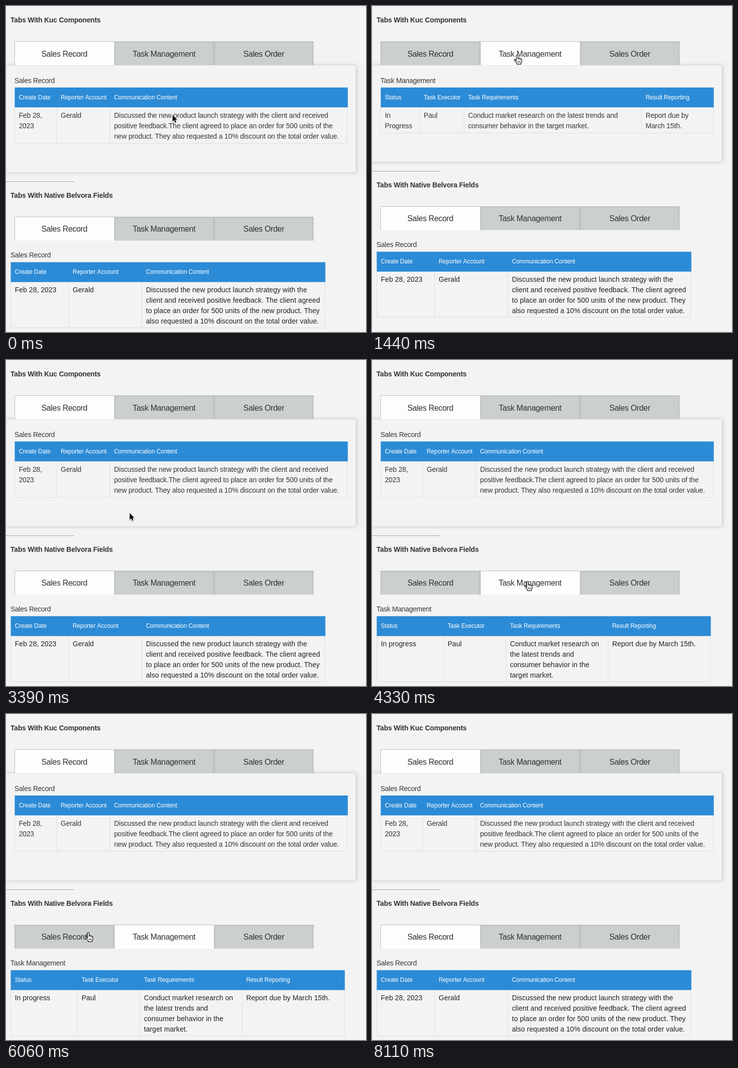
These frames come from a looping animation (722x656 px, 8230 ms). An HTML page with a canvas:

```html
<!DOCTYPE html>
<html lang="en">
<head>
<meta charset="utf-8">
<title>Tabs</title>
<style>
html, body { margin: 0; width: 722px; height: 656px; overflow: hidden; background: #f3f3f3; }
canvas { display: block; }
</style>
</head>
<body>
<canvas id="stage" width="722" height="656"></canvas>
<script>
const ctx = document.getElementById('stage').getContext('2d');
const W = 722, H = 656, LOOP = 8230;
const BG = '#f3f3f3', GREY = '#cbd0ce', BLUE = '#2c8bd6', LINE = '#dfdfdf', EDGE = '#bcc0be';
const FAMILY = '"Liberation Sans", Arial, sans-serif';
const STYLES = {
  heading: { font: 'bold 14px', gap: -0.2, color: '#333' },
  tab: { font: '16px', gap: -0.32, color: '#303030' },
  title: { font: '14px', gap: -0.28, color: '#363636' },
  head: { font: '12px', gap: -0.1, color: '#fff' },
  light: { font: '14px', gap: -0.145, color: '#363636' },
  cell: { font: '14px', gap: 0.08, color: '#202020' }
};
const TABS = ['Sales Record', 'Task Management', 'Sales Order'];
const HEADS = [
  ['Create Date', 'Reporter Account', 'Communication Content'],
  ['Status', 'Task Executor', 'Task Requirements', 'Result Reporting'],
  ['Order Number']
];

// cols: left edge of each column, then the right edge of the table
const UPPER = [
  { cols: [17, 101, 208, 685], panel: 702, lines: 3, cells: [
    'Feb 28,\n2023', 'Gerald',
    'Discussed the new product launch strategy with the client and received\n' +
    'positive feedback.The client agreed to place an order for 500 units of the\n' +
    'new product. They also requested a 10% discount on the total order value.'] },
  { cols: [17, 95, 184, 540, 685], panel: 702, lines: 2, cells: [
    'In\nProgress', 'Paul',
    'Conduct market research on the latest trends and\nconsumer behavior in the target market.',
    'Report due by\nMarch 15th.'] },
  { cols: [17, 109], panel: 634, lines: 1, cells: ['1'] }
];
const LOWER = [
  { cols: [9, 125, 272, 640], lines: 4, cells: [
    'Feb 28, 2023', 'Gerald',
    'Discussed the new product launch strategy with the\n' +
    'client and received positive feedback. The client agreed\n' +
    'to place an order for 500 units of the new product. They\n' +
    'also requested a 10% discount on the total order value.'] },
  { cols: [9, 143, 268, 473, 679], lines: 4, cells: [
    'In progress', 'Paul',
    'Conduct market research on\nthe latest trends and\nconsumer behavior in the\ntarget market.',
    'Report due by March 15th.'] },
  { cols: [9, 136], lines: 1, cells: ['1'] }
];

// [time, selected tab]
const UPPER_CLICKS = [[0, 0], [1130, 1], [2010, 2], [2940, 0]];
const LOWER_CLICKS = [[0, 0], [4320, 1], [4820, 2], [5550, 1], [6150, 0]];
// [time, x, y] of the pointer tip
const PATH = [
  [0, 334, 219], [60, 334, 219], [830, 292, 101], [1440, 291, 99], [1600, 291, 99],
  [1950, 456, 104], [2280, 458, 104], [2480, 456, 104], [2880, 150, 102], [3020, 152, 104],
  [3390, 248, 308], [4110, 312, 446], [4360, 312, 446], [4740, 471, 445], [5000, 473, 444],
  [5100, 473, 444], [5480, 312, 443], [5620, 310, 443], [6060, 165, 440], [6250, 165, 440],
  [6690, 205, 100], [7020, 230, -24]
];

function text(str, x, y, style, align = 'left') {
  const s = STYLES[style];
  ctx.font = s.font + ' ' + FAMILY;
  ctx.letterSpacing = s.gap + 'px';
  ctx.fillStyle = s.color;
  ctx.textAlign = align;
  ctx.fillText(str, x, y);
}

function rect(x, y, w, h, color) {
  ctx.fillStyle = color;
  ctx.fillRect(x, y, w, h);
}

function edgeShade(x, y, w, h, dx, dy) {
  const x0 = dx < 0 ? x + w : x;
  const g = ctx.createLinearGradient(x0, y, x0 + dx, y + dy);
  g.addColorStop(0, 'rgba(0,0,0,.07)');
  g.addColorStop(1, 'rgba(0,0,0,0)');
  rect(x, y, w, h, g);
}

function tabBar(y, active, baseline) {
  TABS.forEach((label, i) => {
    const x = 17 + i * 200, on = i === active;
    rect(x, y, 200, 48, on ? '#fdfdfd' : GREY);
    if (!on) {
      edgeShade(x, y, 200, 48, 4, 0);
      edgeShade(x, y, 200, 48, -4, 0);
      edgeShade(x, y, 200, 48, 0, 4);
    }
    rect(x, y, 200, 1, EDGE);
    rect(x, y, 1, 48, EDGE);
    text(label, x + 100, baseline, 'tab', 'center');
  });
  rect(616, y, 1, 48, EDGE);
}

// nudge: sub-pixel drop of the header band
function table(data, heads, y, bottom, style, nudge) {
  const { cols, cells } = data;
  const left = cols[0], right = cols[cols.length - 1];
  cols.forEach((x, i) => rect(i === cols.length - 1 ? x - 1 : x, y + 40, 1, bottom - y - 40, LINE));
  rect(left, bottom - 1, right - left, 1, LINE);
  rect(left + 0.5, y + nudge, right - left, 40, BLUE);
  heads.forEach((label, i) => text(label, cols[i] + 8.7, y + 24, 'head'));
  cells.forEach((cell, i) => cell.split('\n').forEach((line, row) =>
    text(line, cols[i] + 8.7, y + 61 + row * 21, style)));
}

function panel(w, bottom) {
  ctx.save();
  ctx.shadowColor = 'rgba(0,0,0,.2)';
  ctx.shadowBlur = 7;
  ctx.shadowOffsetX = 1;
  rect(0, 119, w, bottom - 119, BG);
  ctx.restore();
  ctx.strokeStyle = '#e6e6e6';
  ctx.lineWidth = 1;
  ctx.strokeRect(0.5, 119.5, w - 1, bottom - 120);
}

function selected(clicks, t) {
  return clicks.filter(c => c[0] <= t).pop()[1];
}

function pointerAt(t) {
  const i = PATH.findIndex(p => p[0] > t);
  if (i < 0) return null;
  const [t0, x0, y0] = PATH[i - 1], [t1, x1, y1] = PATH[i];
  const u = (t - t0) / (t1 - t0), k = u * u * (3 - 2 * u);
  return { x: x0 + (x1 - x0) * k, y: y0 + (y1 - y0) * k };
}

const ARROW = new Path2D('M0 0V13.4L3.1 10.6L5.2 15.6L7.4 14.7L5.4 9.8H9.4Z');
const HAND = new Path2D('M-1.6 11.5V1Q-1.6 -.5 0 -.5Q1.6 -.5 1.6 1V6' +
  'Q3.6 4.6 4.4 6.6Q6.5 5.6 7.1 7.6Q9.3 7 9.3 9.4V12.4' +
  'Q9.2 14.4 7.7 16V18.2H-.2V16.4Q-3.2 13.5 -5.5 10Q-6 7.9 -4 8.4Z');
const FINGERS = new Path2D('M1.6 6V9M4.4 6.8V9M7.1 7.8V9.6M1.4 11.5V15M3.6 11.5V15M5.8 11.5V15');

function pointer(p, lowerTabs) {
  const over = y => p.x >= 17 && p.x < 617 && p.y >= y && p.y < y + 48;
  const hand = over(71) || over(lowerTabs);
  ctx.save();
  ctx.translate(p.x, p.y);
  ctx.lineJoin = 'round';
  if (hand) {
    ctx.fillStyle = '#fff';
    ctx.fill(HAND);
    ctx.strokeStyle = '#111';
    ctx.lineWidth = 1.2;
    ctx.stroke(HAND);
    ctx.lineWidth = 0.9;
    ctx.stroke(FINGERS);
  } else {
    ctx.shadowColor = 'rgba(0,0,0,.3)';
    ctx.shadowBlur = 2;
    ctx.shadowOffsetY = 1;
    ctx.strokeStyle = '#fff';
    ctx.lineWidth = 2;
    ctx.stroke(ARROW);
    ctx.shadowColor = 'transparent';
    ctx.fillStyle = '#000';
    ctx.fill(ARROW);
  }
  ctx.restore();
}

function draw(t) {
  const up = selected(UPPER_CLICKS, t), low = selected(LOWER_CLICKS, t);
  const top = UPPER[up], under = LOWER[low];
  const topEnd = 214 + top.lines * 21, panelEnd = topEnd + 58;
  const y = panelEnd + 18;
  const underEnd = y + 211 + under.lines * 21;

  rect(0, 0, W, H, BG);
  text('Tabs With Kuc Components', 9, 33, 'heading');
  panel(top.panel, panelEnd);
  tabBar(71, up, 102);
  text(TABS[up], 17, 155, 'title');
  table(top, HEADS[up], 164, topEnd, 'light', 0);

  for (let x = 1; x < 136; x += 2) rect(x, y, 1, 1, '#555');
  text('Tabs With Native Belvora Fields', 9, y + 33, 'heading');
  tabBar(y + 71, low, y + 101);
  text(TABS[low], 9, y + 153, 'title');
  table(under, HEADS[low], y + 162, underEnd, 'cell', 0.5);
  rect(0, underEnd + 32, W, H, GREY);

  const p = pointerAt(t);
  if (p) pointer(p, y + 71);
}

const start = performance.now();
function tick(now) {
  draw(Math.max(0, now - start) % LOOP);
  requestAnimationFrame(tick);
}
draw(0);
requestAnimationFrame(tick);
</script>
</body>
</html>
```
